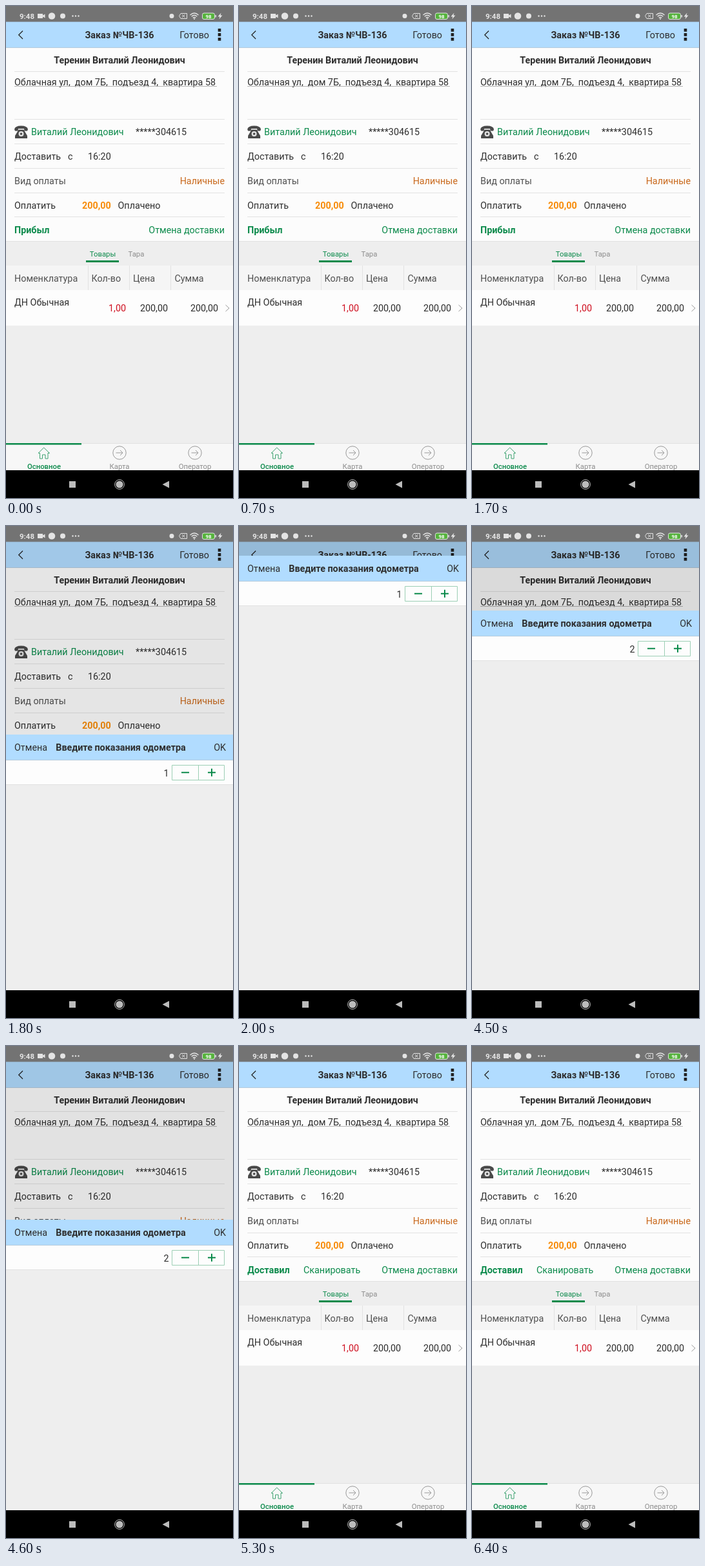
These frames come from a looping animation (352 by 762 pixels, 6800 ms). An HTML page:

```html
<!DOCTYPE html>
<html lang="ru">
<head>
<meta charset="utf-8">
<title>Заказ</title>
<style>
html, body { margin: 0; width: 100%; height: 100%; overflow: hidden; background: #000; }
svg { display: block; }
text { font: 14.34px Roboto, sans-serif; fill: #2e2e2e; white-space: pre; }
.b { font-weight: 700; }
.g { fill: #0b8a4b; }
.s { font-size: 11.3px; }
.grey { fill: #8c8c8c; }
.head { fill: #505050; }
.end { text-anchor: end; }
.mid { text-anchor: middle; }
.line { fill: none; stroke: #e2e2e2; }
.icon { fill: none; stroke: #9a9a9a; }
</style>
</head>
<body>
<svg width="352" height="762" viewBox="0 0 352 762">
  <rect width="352" height="720" fill="#eee"/>

  <g id="order">
    <rect y="24" width="352" height="41" fill="#b1dcff"/>
    <path d="M0 64.5H352" stroke="#b4cbdc"/>
    <path d="M26 38.5L19.7 44.7L26 51" fill="none" stroke="#222" stroke-width="1.2"/>
    <text class="b mid" x="176" y="50">Заказ №ЧВ-136</text>
    <text class="end" x="315" y="50">Готово</text>
    <path d="M331 35V54" stroke="#222" stroke-width="4.6" stroke-dasharray="4.8 2.2"/>

    <rect y="65" width="352" height="299" fill="#fcfcfc"/>
    <path class="line" d="M13 101.5H339M13 175.5H339M13 213.5H339M13 251.5H339M13 289.5H339M13 326.5H339M0 364.5H352"/>
    <text class="b mid" x="176" y="89">Теренин Виталий Леонидович</text>
    <text x="13" y="123">Облачная ул,  дом 7Б,  подъезд 4,  квартира 58</text>
    <path d="M13 124.5H327" stroke="#b4b4b4"/>
    <g fill="#4a4a4a">
      <path d="M13 191Q14 185.5 23.5 185.5T34 191L33 193.5H28.5L28 190H19L18.5 193.5H14Z"/>
      <path d="M19.5 191.5H27.5L33 201V205H14V201Z"/>
      <circle cx="23.5" cy="198" r="4" fill="#e4e4e4"/>
      <circle cx="23.5" cy="198" r="1.8"/>
    </g>
    <text class="g" x="39" y="200">Виталий Леонидович</text>
    <text x="201" y="200">*****304615</text>
    <text x="13" y="238">Доставить</text>
    <text x="96" y="238">с</text>
    <text x="127" y="238">16:20</text>
    <text class="head" x="13" y="276">Вид оплаты</text>
    <text class="end" x="339" y="276" style="fill:#c9691c">Наличные</text>
    <text x="13" y="314">Оплатить</text>
    <text class="b" x="118" y="314" style="fill:#f78c0a">200,00</text>
    <text x="173.5" y="314">Оплачено</text>
    <text class="g b" id="status" x="13" y="352">Прибыл</text>
    <text class="g" id="scan" x="100" y="352">Сканировать</text>
    <text class="g end" x="339" y="352">Отмена доставки</text>

    <text class="g s mid" x="150" y="388">Товары</text>
    <text class="s mid grey" x="202" y="388">Тара</text>
    <rect x="124" y="394" width="51" height="3" fill="#0b8a4b"/>

    <rect y="402" width="352" height="38" fill="#f5f5f5"/>
    <path class="line" d="M127.5 402V440M191.5 402V440M255.5 402V440"/>
    <text class="head" x="13" y="427">Номенклатура</text>
    <text class="head" x="132.5" y="427">Кол-во</text>
    <text class="head" x="197" y="427">Цена</text>
    <text class="head" x="261.5" y="427">Сумма</text>
    <rect y="440" width="352" height="55" fill="#fdfdfd"/>
    <text x="13" y="464">ДН Обычная</text>
    <text class="end" x="186" y="473" style="fill:#cf1020">1,00</text>
    <text class="end" x="251" y="473">200,00</text>
    <text class="end" x="329" y="473">200,00</text>
    <path class="icon" d="M340.5 463L346 468L340.5 473"/>

    <rect y="677" width="352" height="43" fill="#f7f7f7"/>
    <path class="line" d="M0 677.5H352"/>
    <rect y="677" width="117" height="2.5" fill="#0b8a4b"/>
    <path class="icon" style="stroke:#3da270" d="M50 692.5L58.7 684L67.5 692.5H65V701H61V695H56.5V701H52.5V692.5Z"/>
    <g id="arrow" class="icon">
      <circle cx="176" cy="692" r="10.2"/>
      <path d="M170.5 692H181M177 688L181 692L177 696"/>
    </g>
    <use href="#arrow" x="117"/>
    <text class="g s mid" x="59" y="716.5" style="font-weight:500">Основное</text>
    <text class="s mid grey" x="176" y="716.5">Карта</text>
    <text class="s mid grey" x="293" y="716.5">Оператор</text>
  </g>

  <rect id="dim" y="24" width="352" height="696"/>

  <g id="sheet">
    <rect width="352" height="695" fill="#eee"/>
    <rect width="352" height="40" fill="#b1dcff"/>
    <path d="M0 39.5H352" stroke="#b4cbdc"/>
    <text x="13" y="25">Отмена</text>
    <text class="b mid" x="178" y="25">Введите показания одометра</text>
    <text class="end" x="341" y="25">OK</text>
    <rect y="40" width="352" height="38" fill="#fdfdfd"/>
    <path class="line" d="M0 77.5H352"/>
    <text class="end" id="count" x="252.5" y="64.5">1</text>
    <path d="M257.5 47.5H338.5V70.5H257.5ZM298.5 47.5V70.5" fill="none" stroke="#9ccfb5"/>
    <path d="M272 58.8H284M313 58.8H325M319 52.8V64.8" stroke="#0b8a4b" stroke-width="2"/>
  </g>

  <rect width="352" height="24.5" fill="#737373"/>
  <g fill="#e4e4e4">
    <text class="b" x="21" y="19.7" style="font-size:11.5px;fill:#e4e4e4">9:48</text>
    <path d="M49 12H57V14.5L60.5 12.5V18.5L57 16.5V19H49Z"/>
    <circle cx="71" cy="15.5" r="5.3"/>
    <circle cx="88" cy="15.5" r="4"/>
    <circle cx="103.5" cy="15.5" r="1.2"/>
    <circle cx="108" cy="15.5" r="1.2"/>
    <circle cx="112.5" cy="15.5" r="1.2"/>
    <circle cx="257" cy="15.5" r="3.5"/>
    <path d="M271 11.5H280.5V19.5H271L268.5 15.5ZM273 13.5L277.5 17.5M277.5 13.5L273 17.5" fill="none" stroke="#e4e4e4"/>
    <path d="M285.5 14Q292 8 298.5 14M287.7 16.3Q292 12.3 296.3 16.3M289.8 18.5Q292 16.5 294.2 18.5" fill="none" stroke="#e4e4e4" stroke-width="1.3"/>
    <circle cx="292" cy="20" r="1"/>
    <rect x="304.5" y="11" width="19" height="9.5" rx="2.5" fill="#55b33c" stroke="#e4e4e4"/>
    <rect x="324.5" y="14" width="1.5" height="3.5"/>
    <text class="b mid" x="314" y="18.7" style="font-size:8px;fill:#fff">98</text>
    <path d="M333.5 10.5L328.5 16.5H331.5L330.5 20.5L335.5 14.5H332.5Z"/>
  </g>

  <rect y="719" width="352" height="43"/>
  <g fill="#bcbcbc">
    <rect x="98" y="736" width="10" height="10"/>
    <circle cx="176" cy="741" r="5.6"/>
    <circle cx="176" cy="741" r="7.4" fill="none" stroke="#bcbcbc"/>
    <path d="M253 735.5V746.5L242.5 741Z"/>
  </g>
</svg>
<script>
const LOOP = 6800, TICK = 100, TOP = 25, TRAVEL = 695;
const $ = id => document.getElementById(id);
const progress = (t, start, length) => Math.min(1, Math.max(0, (t - start) / length));

// Share of the sheet's travel still hidden: decelerates in, accelerates out.
function hiddenShare(t) {
  return t < 4300
    ? (1 - progress(t, 1700, 500)) ** 3.8
    : progress(t, 4300, 500) ** 2.05;
}

function draw() {
  const now = performance.now() % LOOP;
  const t = Math.floor(now / TICK) * TICK;
  const hidden = hiddenShare(t);
  const delivered = t >= 5000;
  $('sheet').setAttribute('transform', `translate(0 ${Math.round(TOP + TRAVEL * hidden)})`);
  $('dim').setAttribute('opacity', 0.16 * (1 - hidden));
  $('count').textContent = t < 3000 ? 1 : 2;
  $('status').textContent = delivered ? 'Доставил' : 'Прибыл';
  $('scan').setAttribute('visibility', delivered ? 'visible' : 'hidden');
  requestAnimationFrame(draw);
}
draw();
</script>
</body>
</html>
```
